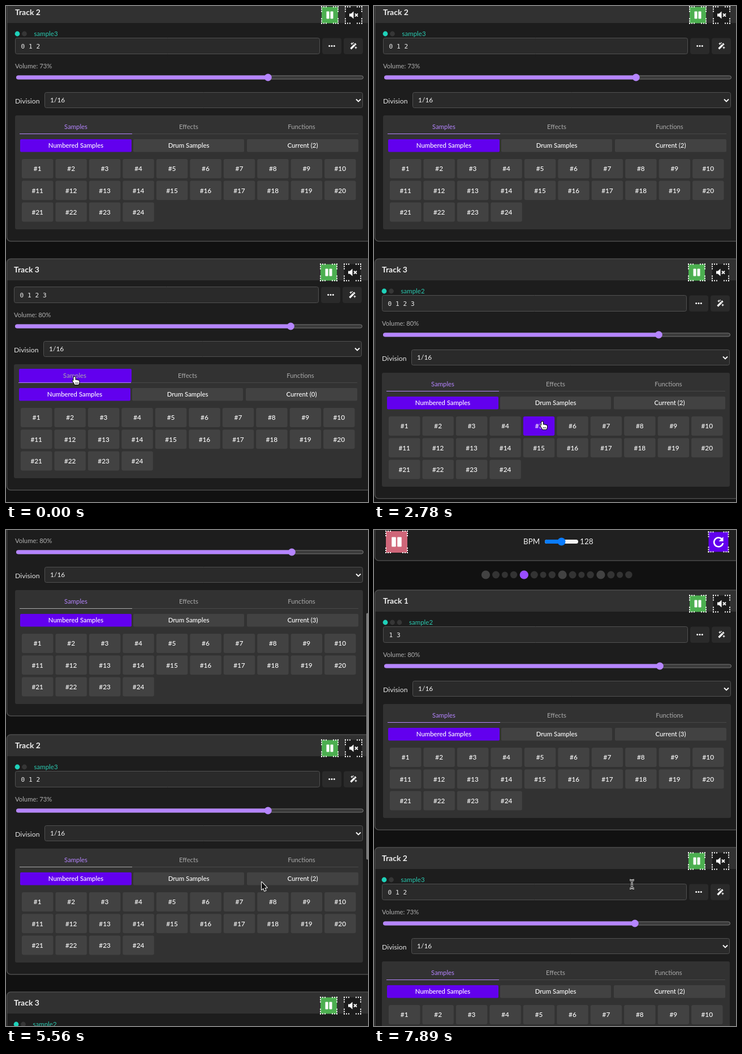
An HTML page with a canvas for the animation above (8000 ms loop, 640 by 875 pixels).

```html
<!DOCTYPE html>
<html>
<head>
<meta charset="utf-8">
<style>
  html, body { margin: 0; width: 100%; height: 100%; overflow: hidden; background: #111; }
  canvas { display: block; }
</style>
</head>
<body>
<canvas id="stage" width="640" height="875"></canvas>
<script>
const ctx = document.getElementById('stage').getContext('2d');
const LOOP = 8000, PITCH = 456, STEP = 60000 / 128 / 4;
const VIOLET = '#6200ee', LILAC = '#b585ff', TEAL = '#1fd1b9', BUTTON = '#424242';
const SANS = 'Lato, "Open Sans", sans-serif';
const MONO = '"DejaVu Sans Mono", monospace';

const SCROLL = [[5220, 0], [5330, 3], [5560, 368], [5700, 500], [5890, 547], [6890, 547], [7200, 570]];
const MOUSE_X = [[130, 121], [480, 114], [1000, 114], [1600, 237], [2450, 237], [3000, 330], [3400, 500],
  [3660, 535], [3780, 547], [4220, 547], [4700, 452], [5900, 452], [6200, 456]];
const MOUSE_Y = [[130, 654], [480, 735], [1000, 736], [1600, 742], [2450, 742], [3000, 728], [3400, 672],
  [3660, 661], [3780, 638], [4220, 638], [4700, 621], [5900, 621], [6200, 624], [6890, 624], [7200, 625]];

const clamp = v => Math.max(0, Math.min(1, v));

function track(keys, t, ease = u => u) {
  let [t0, v0] = keys[0];
  for (const [t1, v1] of keys) {
    if (t < t1) return t <= t0 ? v0 : v0 + (v1 - v0) * ease((t - t0) / (t1 - t0));
    [t0, v0] = [t1, v1];
  }
  return v0;
}
const smooth = u => u * u * (3 - 2 * u);

function box(x, y, w, h, r, fill, stroke, line = 1) {
  ctx.beginPath();
  ctx.roundRect(x, y, w, h, r);
  if (fill) { ctx.fillStyle = fill; ctx.fill(); }
  if (stroke) { ctx.strokeStyle = stroke; ctx.lineWidth = line; ctx.stroke(); }
}

function disc(x, y, r, fill) {
  ctx.beginPath();
  ctx.arc(x, y, r, 0, 7);
  ctx.fillStyle = fill;
  ctx.fill();
}

// y is the middle of the capitals
function text(str, x, y, size, color, weight = 400, align = 'left', family = SANS) {
  ctx.font = `${weight} ${size}px ${family}`;
  ctx.textAlign = align;
  ctx.fillStyle = color;
  ctx.fillText(str, x, y + size * 0.36);
}

function path(d, fill, stroke, line = 1) {
  const p = new Path2D(d);
  if (stroke) { ctx.strokeStyle = stroke; ctx.lineWidth = line; ctx.stroke(p); }
  if (fill) { ctx.fillStyle = fill; ctx.fill(p); }
}

function at(x, y, draw) {
  ctx.save();
  ctx.translate(x, y);
  draw();
  ctx.restore();
}

function dottedButton(x, y, half, fill, icon) {
  at(x, y, () => {
    box(-half, -half, half * 2, half * 2, 0, fill);
    ctx.fillStyle = '#fff';
    for (const sx of [-1, 1]) for (const sy of [-1, 1]) for (const d of [0, 4, 8]) {
      ctx.fillRect(sx * (half - d) - 1, sy * half - 1, 2, 2);
      ctx.fillRect(sx * half - 1, sy * (half - d) - 1, 2, 2);
    }
    icon();
  });
}

function pauseIcon(w, h, gap) {
  box(-gap / 2 - w, -h / 2, w, h, 1, '#fff');
  box(gap / 2, -h / 2, w, h, 1, '#fff');
}

function muteIcon() {
  path('M-7.5-2.5h3l4.5-4v13l-4.5-4h-3z', '#fff');
  path('M2.5-2.5l5 5M7.5-2.5l-5 5', null, '#fff', 1.8);
}

function reloadIcon() {
  path('M5.5-5.5A8 8 0 1 0 8 2', null, '#fff', 2.6);
  path('M8.5-9v8h-8z', '#fff');
}

function wandIcon() {
  path('M-5 5L4-4', null, '#fff', 3.2);
  path('M1.2-3L3 -1.2', null, '#2a2a2a', 1);
  path('M-3-6v4M-5-4h4M4 1v4M2 3h4M-.5-6.5v2', null, '#fff', 1.2);
}

// mouse position inside the current card, or null while nothing reacts
let pointer = null, overButton = false;

function hit(x, y, w, h) {
  const inside = pointer && pointer.x > x && pointer.x < x + w && pointer.y > y && pointer.y < y + h;
  if (inside) overButton = true;
  return inside;
}

function header(y, t) {
  box(1.5, -200, 644, y - 70 + 200, 7, '#202020', '#4a4a4a', 1.5);
  dottedButton(40, y - 103, 19, '#cf6679', () => pauseIcon(7.5, 17, 2.5));
  text('BPM', 264, y - 103.5, 13.4, '#f0f0f0');
  box(302, y - 107, 59, 7, 3.5, '#f4f4f4');
  box(302, y - 107, 30, 7, 3.5, '#0a7cff');
  disc(331.5, y - 103.5, 7, '#0a7cff');
  text('128', 364, y - 103.5, 13.6, '#f0f0f0');
  dottedButton(609, y - 103, 17.5, VIOLET, reloadIcon);

  const step = 12.25 + (t - 6890) / STEP + 160;
  const now = Math.floor(step) % 16, rise = clamp((step % 1) / 0.35);
  for (let i = 0; i < 16; i++) {
    const k = i % 4, x = 197.5 + (i >> 2) * 67.8 + [0, 18, 33.8, 49.5][k];
    const r = [7.6, 6.5, 5.5, 6.2][k];
    disc(x, y - 45, r, k ? '#333' : '#424242');
    ctx.globalAlpha = i === now ? rise : i === (now + 15) % 16 ? 1 - rise : 0;
    disc(x, y - 45, r, '#994dff');
    ctx.globalAlpha = 1;
  }
}

function volumeSlider(volume) {
  const knob = 24.5 + 601 * volume / 100;
  text(`Volume: ${volume}%`, 16, 95.5, 11.3, '#b0b0b0');
  box(18.5, 113, 613, 6, 3, '#3a3a3a', '#777');
  box(18, 112.5, knob - 18, 7, 3.5, LILAC);
  disc(knob, 116, 6.5, LILAC);
}

function samplePanel(count, scrolling) {
  box(16, 183, 615, 201, 3, '#323232');
  ctx.fillStyle = '#484848';
  ctx.fillRect(24, 215, 599, 1);
  ['Samples', 'Effects', 'Functions'].forEach((name, i) => {
    const x = 25 + i * 199.5, over = hit(x, 191, 199, 24);
    if (over) box(x, 191, 199, 24, 2, VIOLET);
    text(name, x + 98.5, 202.5, 11.3, i || over ? '#aaa' : LILAC, 400, 'center');
  });
  ctx.fillStyle = scrolling ? '#aaa' : LILAC;
  ctx.fillRect(24, 215, 199, 1);

  [['Numbered Samples', 25, 197], ['Drum Samples', 225, 196], [`Current (${count})`, 426, 197]]
    .forEach(([name, x, w], i) => {
      box(x, 225, w, 22.5, 2, !i || hit(x, 225, w, 22.5) ? VIOLET : BUTTON);
      text(name, x + w / 2, 236, 11.4, '#fff', 500, 'center');
    });

  for (let i = 0; i < 24; i++) {
    const x = 28 + (i % 10) * 59.45, y = 260 + Math.floor(i / 10) * 38.3;
    box(x, y, 55.5, 34, 3, hit(x, y, 55.5, 34) ? VIOLET : BUTTON);
    text('#' + (i + 1), x + 27.7, y + 17, 11.8, '#fff', 500, 'center');
  }
}

function card({ title, sample, count, pattern, volume }, y, hovered, mouse, scrolling) {
  const lift = count ? 0 : 15, shift = hovered ? 2 : 0;
  y -= shift;
  if (y > 900 || y < -420) return;

  ctx.save();
  box(1.5, y - 18, 644, 423 - lift, 7, '#1d1d1d');
  ctx.clip();
  ctx.fillStyle = '#313131';
  ctx.fillRect(0, y - 18, 650, 38);
  ctx.restore();
  box(1.5, y - 18, 644, 423 - lift, 7, null, '#4c4c4c', 1.5);

  ctx.save();
  ctx.translate(-shift, y);
  text(title, 16, 0.5, 14, '#f2f2f2', 700);
  dottedButton(572.5, 6, 14.5, '#4caf50', () => pauseIcon(5, 13, 2));
  dottedButton(614.5, 6, 14.5, '#1b1b1b', muteIcon);
  if (count) {
    for (let i = 0; i < count; i++) disc(20 + i * 12.5, 39, 4.4, i ? '#363636' : TEAL);
    text(sample, 24.5 + count * 12.5, 39, 11.5, '#2bc9b0');
  }

  ctx.translate(0, -lift);
  pointer = hovered && mouse && { x: mouse.x + shift, y: mouse.y - y + lift };
  box(16.5, 46.5, 538, 28, 3, '#2a2a2a', '#515151');
  text(pattern, 26.5, 60.5, 11.2, '#f0f0f0', 400, 'left', MONO);
  box(559, 46.5, 34, 28.5, 4, '#2a2a2a');
  for (const dx of [-4.3, 0, 4.3]) disc(576 + dx, 60.5, 1.5, '#fff');
  box(597, 46.5, 34, 28.5, 4, '#2a2a2a');
  at(614.5, 60.5, wandIcon);
  volumeSlider(volume);
  text('Division', 16, 157.5, 12.3, '#e4e4e4');
  box(68.5, 142.5, 562, 27, 3, '#2a2a2a', '#515151');
  text('1/16', 78, 156, 12, '#f2f2f2');
  path('M619 154.5l4 4 4-4', null, '#fff', 1.8);
  samplePanel(count, scrolling);
  ctx.restore();
}

function cursor(x, y, kind) {
  at(x, y, () => {
    ctx.lineJoin = 'round';
    if (kind === 'hand') {
      path('M-1.5 1Q0-1 1.5 1V6Q3 4.6 4.2 6.2Q5.6 5.2 6.6 6.8Q8.5 6 8.5 8.2V10.5Q8 12.5 7 14H0.5Q-1-11-1.5 10Q-4 7.5-3.5 6.6Q-2.6 6-1.5 7.6z'
        .replace('Q-1-11', 'Q-1 11'), '#fff', '#000', 2);
      path('M2 10v2.5M4 10v2.5M6 10v2.5', null, '#000', 0.8);
    } else if (kind === 'text') {
      const beam = 'M-4-7.5Q0-7.5 0-5Q0-7.5 4-7.5M0-5V5M-4 7.5Q0 7.5 0 5Q0 7.5 4 7.5M-2 2h4';
      path(beam, null, '#fff', 2.8);
      path(beam, null, '#000', 1);
    } else {
      path('M0 0V13.5L3-10.8'.replace('-10.8', ' 10.8') + 'L5 15.8L7.4 14.8L5.3 10H9.5z', '#111', '#fff', 2);
    }
  });
}

function render(t) {
  const scroll = Math.round(track(SCROLL, t));
  const mouse = { x: track(MOUSE_X, t, smooth), y: track(MOUSE_Y, t, smooth) };
  const hovered = t < 6000 ? 2 : 1;
  const scrolling = t >= 5220 && t < 7500;
  const picked = t < 600 ? 0 : t < 2150 ? 1 : 2;
  const cards = [
    { title: 'Track 1', sample: 'sample2', count: 3, pattern: '1 3', volume: 80 },
    { title: 'Track 2', sample: 'sample3', count: 2, pattern: '0 1 2', volume: 73 },
    { title: 'Track 3', sample: 'sample2', count: picked, pattern: '0 1 2 3', volume: 80 },
  ];

  ctx.fillStyle = '#111';
  ctx.fillRect(0, 0, 640, 875);
  overButton = false;
  const top = scroll - 446;
  if (top > 0) header(top, t);
  cards.forEach((c, i) => card(c, top + i * PITCH, i === hovered, t < 5000 ? mouse : null, scrolling));

  if (scrolling) {
    ctx.globalAlpha = clamp((7500 - t) / 200);
    box(637, 329.5 - scroll * 0.496, 4, 435, 2, '#7c7c7c');
    ctx.globalAlpha = 1;
  }
  cursor(mouse.x, mouse.y, overButton ? 'hand' : t > 6000 ? 'text' : 'arrow');
}

function tick() {
  render(performance.now() % LOOP);
  requestAnimationFrame(tick);
}
tick();
</script>
</body>
</html>
```
